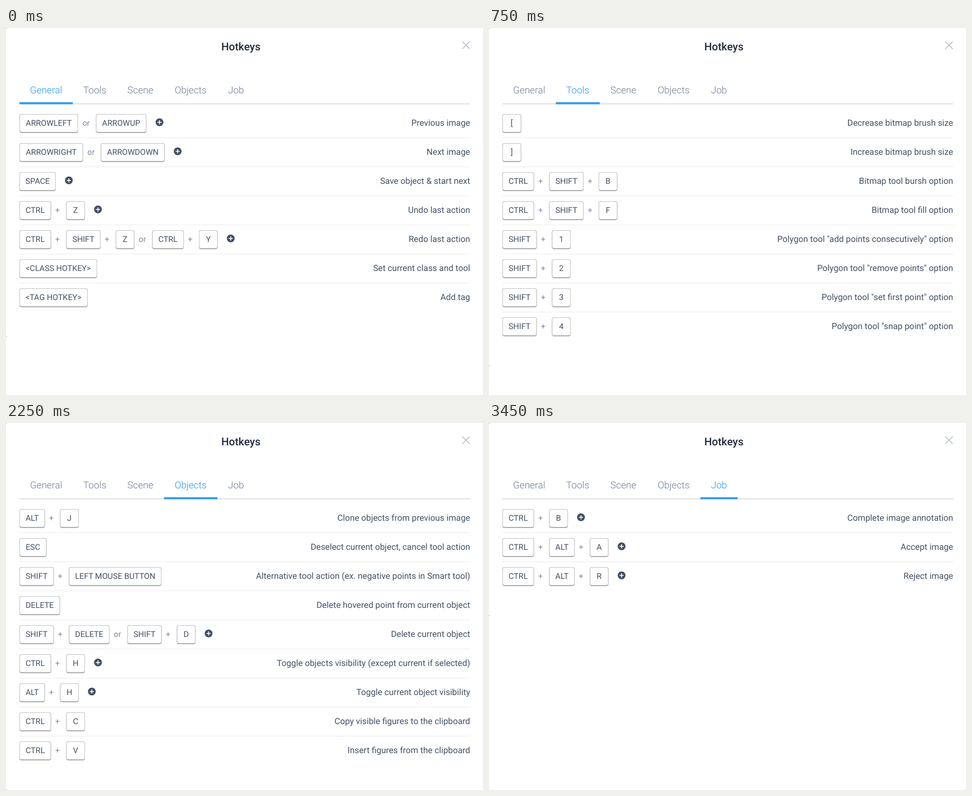
An HTML page that plays this animation: 853x657 px, repeating every 3750 ms.

```html
<!DOCTYPE html>
<html lang="en">
<head>
<meta charset="utf-8">
<title>Hotkeys</title>
<style>
html, body { margin: 0; width: 100%; height: 100%; overflow: hidden; background: #fff; }
svg { display: block; width: 853px; height: 657px; }
text { font-family: Roboto, sans-serif; font-weight: 400; fill: #435063; text-rendering: geometricPrecision; }
.title { font-size: 19.2px; font-weight: 500; fill: #20293a; }
.tab { font-size: 17.2px; font-weight: 300; fill: #6b7a92; }
.tab.on { fill: #2196f3; }
.key { font-size: 14.4px; }
.sep { font-size: 14.4px; fill: #7c8aa3; }
.desc { font-size: 15.36px; }
.mid { text-anchor: middle; }
.end { text-anchor: end; }
.panel { visibility: hidden; animation: show 3750ms step-end infinite; }
@keyframes show {
  0% { visibility: visible; }
  20%, 100% { visibility: hidden; }
}
</style>
</head>
<body>
<svg id="stage" viewBox="0 0 853 657">
  <rect width="1" height="1" fill="#777"/>
  <text class="title mid" x="420" y="40">Hotkeys</text>
  <path d="M816 24.3l13.2 13.2M829.2 24.3l-13.2 13.2" stroke="#b5bfcc" stroke-width="1.6" fill="none"/>
</svg>
<script>
const NS = 'http://www.w3.org/2000/svg';
const LEFT = 24, RIGHT = 830, TOP = 145, ROW = 52, STEP = 750;

const tabs = ['General', 'Tools', 'Scene', 'Objects', 'Job'];
const edges = [24, 119.5, 198, 282.5, 378, 444.5];

// Key caps wider than the minimum.
const capWidth = {
  CTRL: 56.6, SHIFT: 61.5, ALT: 45.6, ESC: 48.4, SPACE: 65, DELETE: 72.6,
  ARROWLEFT: 105, ARROWUP: 90.3, ARROWRIGHT: 113.8, ARROWDOWN: 114,
  'MOUSE WHEEL': 121, 'LEFT MOUSE BUTTON': 165.5,
  '<CLASS HOTKEY>': 139, '<TAG HOTKEY>': 122
};

// In a shortcut, ~ joins keys, | separates alternatives, * is the add button.
const panels = [
  [
    ['ARROWLEFT|ARROWUP*', 'Previous image'],
    ['ARROWRIGHT|ARROWDOWN*', 'Next image'],
    ['SPACE*', 'Save object & start next'],
    ['CTRL~Z*', 'Undo last action'],
    ['CTRL~SHIFT~Z|CTRL~Y*', 'Redo last action'],
    ['<CLASS HOTKEY>', 'Set current class and tool'],
    ['<TAG HOTKEY>', 'Add tag']
  ], [
    ['[', 'Decrease bitmap brush size'],
    [']', 'Increase bitmap brush size'],
    ['CTRL~SHIFT~B', 'Bitmap tool bursh option'],
    ['CTRL~SHIFT~F', 'Bitmap tool fill option'],
    ['SHIFT~1', 'Polygon tool "add points consecutively" option'],
    ['SHIFT~2', 'Polygon tool "remove points" option'],
    ['SHIFT~3', 'Polygon tool "set first point" option'],
    ['SHIFT~4', 'Polygon tool "snap point" option']
  ], [
    ['ALT~-|ALT~MOUSE WHEEL', 'Decrease points size'],
    ['ALT~+|ALT~MOUSE WHEEL', 'Increase points size'],
    ['SHIFT~-|SHIFT~MOUSE WHEEL', 'Decrease objects opacity'],
    ['SHIFT~+|SHIFT~MOUSE WHEEL', 'Increase objects opacity'],
    ['SHIFT~[|SHIFT~{*', 'Decrease brightness'],
    ['SHIFT~]|SHIFT~}*', 'Increase brightness'],
    ['SHIFT~H', "Randomize objects' colors"],
    ['ALT~K', 'Clone image tags from previous image']
  ], [
    ['ALT~J', 'Clone objects from previous image'],
    ['ESC', 'Deselect current object, cancel tool action'],
    ['SHIFT~LEFT MOUSE BUTTON', 'Alternative tool action (ex. negative points in Smart tool)'],
    ['DELETE', 'Delete hovered point from current object'],
    ['SHIFT~DELETE|SHIFT~D*', 'Delete current object'],
    ['CTRL~H*', 'Toggle objects visibility (except current if selected)'],
    ['ALT~H*', 'Toggle current object visibility'],
    ['CTRL~C', 'Copy visible figures to the clipboard'],
    ['CTRL~V', 'Insert figures from the clipboard']
  ], [
    ['CTRL~B*', 'Complete image annotation'],
    ['CTRL~ALT~A*', 'Accept image'],
    ['CTRL~ALT~R*', 'Reject image']
  ]
];

function add(parent, tag, attrs, text) {
  const el = document.createElementNS(NS, tag);
  for (const name in attrs) el.setAttribute(name, attrs[name]);
  if (text) el.textContent = text;
  return parent.appendChild(el);
}

const label = (g, cls, x, y, text) => add(g, 'text', { class: cls, x, y }, text);
const box = (g, x, y, width, height, fill, rx = 0) =>
  add(g, 'rect', { x, y, width, height, fill, rx });

function drawKey(g, x, y, name) {
  const w = capWidth[name] || 33.5;
  box(g, x, y + 9, w, 34, '#a9a9a9', 4);
  box(g, x, y + 9, w, 32.5, '#c6c6c6', 4);
  box(g, x + 1, y + 10, w - 2, 31, '#fff', 3);
  label(g, 'key mid', x + w / 2, y + 30.2, name);
  return x + w;
}

function drawAdd(g, x, y) {
  add(g, 'circle', { cx: x, cy: y, r: 7, fill: '#414e62' });
  add(g, 'path', { d: `M${x - 3.7} ${y}h7.4M${x} ${y - 3.7}v7.4`, stroke: '#fff', 'stroke-width': 1.6 });
}

function drawShortcut(g, y, keys) {
  let x = LEFT;
  for (const part of keys.split(/([~|*])/)) {
    if (part === '~') {
      label(g, 'sep mid', x + 11.4, y + 30.2, '+');
      x += 27;
    } else if (part === '|') {
      label(g, 'sep mid', x + 14.2, y + 30.2, 'or');
      x += 31.8;
    } else if (part === '*') {
      drawAdd(g, x + 23.4, y + 23.7);
    } else if (part) {
      x = drawKey(g, x, y, part);
    }
  }
}

function drawPanel(rows, active) {
  const g = add(stage, 'g', { class: 'panel' });
  g.style.animationDelay = (active - panels.length) * STEP + 'ms';

  box(g, LEFT, 135, RIGHT - LEFT, 1.5, '#d5d8dc');
  tabs.forEach((name, i) => {
    const cls = i === active ? 'tab mid on' : 'tab mid';
    label(g, cls, (edges[i] + edges[i + 1]) / 2, 117.4, name);
  });
  box(g, edges[active], 132.8, edges[active + 1] - edges[active], 3.7, '#2e9bf0');

  rows.forEach(([keys, text], i) => {
    const y = TOP + i * ROW;
    drawShortcut(g, y, keys);
    label(g, 'desc end', RIGHT, y + 30.3, text);
    if (i < rows.length - 1) box(g, LEFT, y + 51, RIGHT - LEFT, 1, '#ececee');
  });
  box(g, 0, 188 + rows.length * ROW, 1, 1, '#777');
}

const stage = document.getElementById('stage');
panels.forEach(drawPanel);
</script>
</body>
</html>
```
